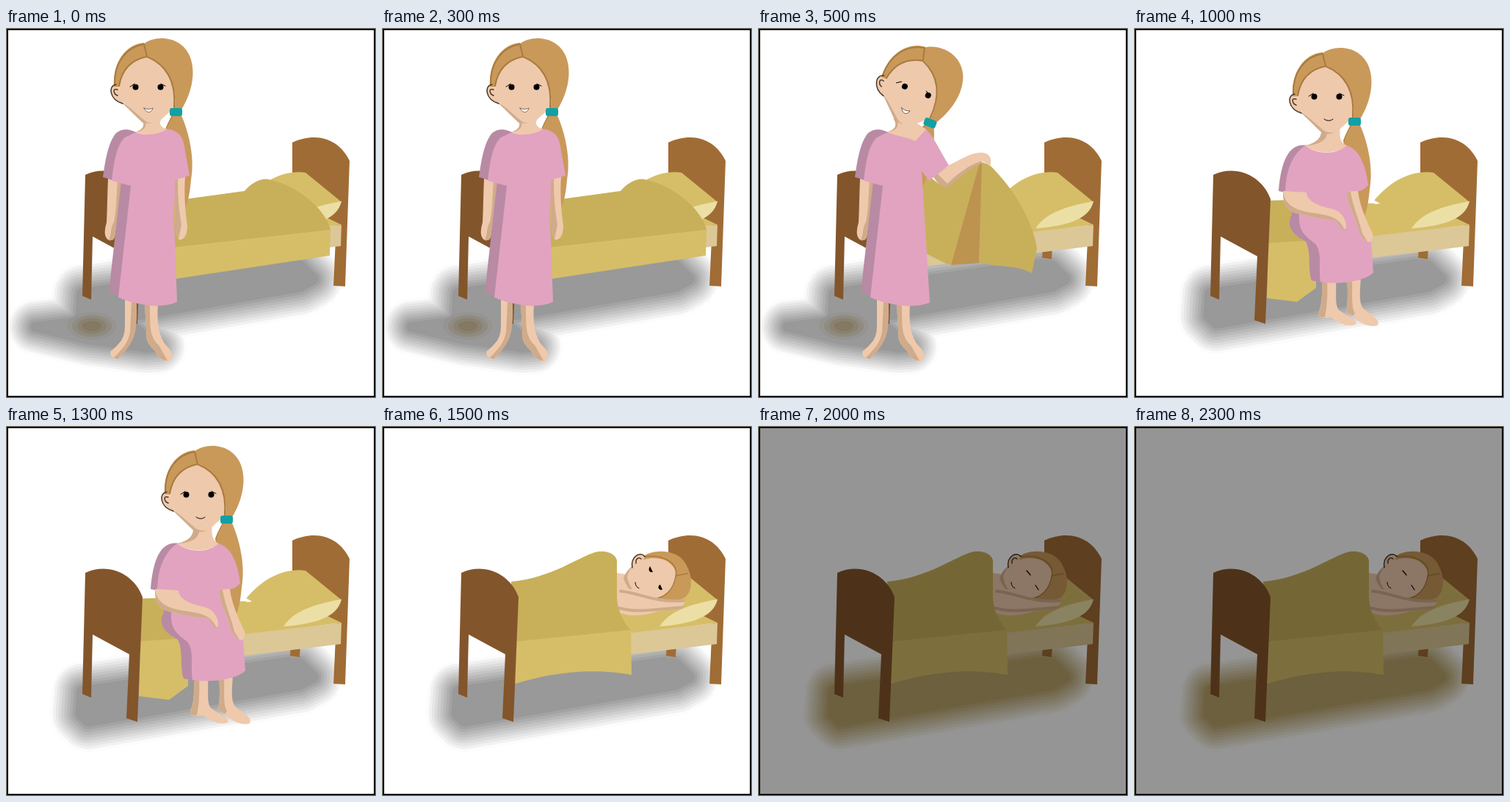
An HTML page with a canvas that plays this animation: 504 by 504 pixels, repeating every 2500 ms.

```html
<!DOCTYPE html>
<html lang="en">
<head>
<meta charset="utf-8">
<title>Bedtime</title>
<style>
html, body { margin: 0; width: 100%; height: 100%; overflow: hidden; background: #fff; }
canvas { display: block; width: 504px; height: 504px; }
</style>
</head>
<body>
<canvas id="stage" width="504" height="504"></canvas>
<script>
const ctx = document.getElementById('stage').getContext('2d');
const STEP = 500;
const C = {
  skin: '#efc9ac', skinDark: '#d0ab8b', hair: '#c9995a', strand: '#a87b3e',
  pink: '#e2a3c0', pinkDark: '#b98aa4', tie: '#12a0a5', ink: '#000',
  wood: '#a06c35', woodDark: '#83552b',
  cover: '#c8b05a', sheet: '#d6be68', mattress: '#dcc797', pillow: '#ecdfa5'
};

function fill(color, path) {
  ctx.fillStyle = color;
  ctx.fill(new Path2D(path));
}

function line(color, width, path) {
  ctx.strokeStyle = color;
  ctx.lineWidth = width;
  ctx.lineCap = ctx.lineJoin = 'round';
  ctx.stroke(new Path2D(path));
}

function oval(color, x, y, rx, ry = rx) {
  ctx.fillStyle = color;
  ctx.beginPath();
  ctx.ellipse(x, y, rx, ry, 0, 0, Math.PI * 2);
  ctx.fill();
}

// Soft shadow built from stepped rings around solid cores
function shadow(withPerson, tint) {
  const cores = [['M104 362L102 392L112 402L400 352L418 342L400 324L385 322Z', 42]];
  if (withPerson) cores.push(['M40 407L110 399L160 397L208 434L190 435L110 424Z', 38]);
  const rings = 11;
  for (let i = 0; i <= rings; i++) {
    const k = i / rings;
    const mix = Math.min(1, 0.03 + 1.2 * k);
    const color = `rgb(${tint.map(v => Math.round(255 + (v - 255) * mix))})`;
    for (const [path, reach] of cores) {
      fill(color, path);
      if (i < rings) line(color, 2 * reach * (1 - k), path);
    }
  }
  if (withPerson) {
    for (let k = 0; k < 4; k++) {
      oval(`rgb(${150 - k * 6},${148 - k * 9},${145 - k * 16})`, 117, 406, 34 - k * 7, 19 - k * 4);
    }
  }
}

function bed() {
  fill(C.wood, 'M388 295L401 295L400 315L387 313Z');
  fill(C.wood, 'M390 156C425 140 455 153 468 181L462 352L446 351L450 268L390 262Z');
  fill(C.sheet, 'M183 236L330 239L432 256L457 268L340 283L183 300Z');
  fill(C.mattress, 'M183 300L457 268L456 297L183 330Z');
  fill(C.sheet, 'M327 235C350 207 380 193 408 197L457 237C440 262 410 268 378 273Z');
  fill(C.pillow, 'M378 273C393 249 430 241 457 236C451 263 415 270 378 273Z');
}

function footboard() {
  fill(C.woodDark, 'M108 200C140 185 175 202 186 233L179 403L164 398L168 311L118 284L116 370L104 365Z');
}

function placed(pose, draw) {
  ctx.save();
  ctx.translate(190.5 + pose.dx, 101 + pose.dy);
  ctx.rotate(pose.turn * Math.PI / 180);
  ctx.translate(-190.5, -101);
  draw();
  ctx.restore();
}

function ponytail() {
  fill(C.hair, 'M227 116L238 117C251 146 257 180 252 207C250 228 248 238 241 252L231 245L216 140C219 133 223 125 227 116Z');
  line(C.strand, 1, 'M228 118C222 127 218 135 217 142');
}

function head({ smiling = false, gaze = 0 } = {}) {
  fill(C.hair, 'M187 22C205 8 242 11 252 43C260 70 247 98 239 111L226 112L190 45Z');
  fill(C.skin, 'M153 77C139 76 139 96 159 103Z');
  fill(C.skinDark, 'M153 97L186 129L198 130L174 112Z');
  fill(C.skin, 'M154 79C157 55 172 41 192 38C216 48 233 72 230 108L211 125C203 131 196 130 190 127L156 98Z');
  fill(C.hair, 'M147 80C145 47 163 22 188 20L192 39C173 43 157 56 154 80Z');
  line(C.strand, 2, 'M188 22L192 39C216 49 232 70 229 108M154 79C158 55 172 43 192 39M148 77C147 48 163 26 188 22');
  line('#49382a', 1.5, 'M150 77C139 78 140 97 159 103M152 84C145 81 146 90 152 92');
  oval(C.ink, 176.5 + gaze, 80.5, 4);
  oval(C.ink, 210.5 + gaze, 80.5, 4);
  line(C.ink, 1, 'M169 80L175 76M211 76L217 79');
  if (smiling) {
    line(C.ink, 1, 'M190 111C194 114 199 114 202 111');
  } else {
    const mouth = 'M188 109C192 111 196 111 200 109C198 117 191 116 188 109Z';
    fill('#fff', mouth);
    line('#5a443a', 0.8, mouth);
  }
  ctx.fillStyle = C.tie;
  ctx.beginPath();
  ctx.roundRect(223, 109, 17, 11, 3);
  ctx.fill();
}

function standingLegs() {
  fill(C.skin, 'M162 370L178 375C178 400 177 415 172 425C165 438 158 445 152 451C145 450 140 445 143 440C158 428 162 420 162 405Z');
  fill(C.skinDark, 'M178 375C178 400 177 415 172 425C165 438 158 445 152 451L147 449C158 438 167 428 169 414L171 373Z');
  fill(C.skin, 'M189 376L207 376C205 400 208 420 218 432C226 440 230 448 222 454C212 455 207 447 203 440C193 430 190 425 191 410Z');
  fill(C.skinDark, 'M189 376L196 377C196 408 196 421 208 432L220 453C211 453 207 447 203 440C193 430 190 425 191 410Z');
}

function standingBody(lifting) {
  standingLegs();
  fill(C.skin, 'M139 205L158 211C155 240 157 260 149 278C149 288 145 290 140 289C133 285 134 275 137 265C138 245 138 225 139 205Z');
  fill(C.skinDark, 'M152 209L158 211C155 240 157 260 149 278C149 288 145 290 140 289C144 280 142 273 147 264C151 246 150 228 152 209Z');
  if (!lifting) {
    fill(C.skin, 'M229 205L244 203C242 230 245 255 247 270C247 285 240 290 235 288L231 275Z');
    fill(C.skinDark, 'M229 205L234 206C234 232 236 252 239 267L235 288L231 275Z');
  }
  fill(C.pinkDark, 'M150 143C160 136 168 138 177 142L172 216L132 203C135 181 139 156 150 143Z');
  fill(C.pinkDark, 'M157 208L175 212L158 367L140 360Z');
  const right = lifting
    ? 'L229 138C239 147 248 168 260 187L233 208L223 195L227 260L234 374'
    : 'C237 140 241 149 243 162L250 201L230 207L229 260L233 373';
  fill(C.pink, 'M177 142C192 148 206 144 217 137' + right +
    'C212 383 180 378 153 367L170 215L144 208C147 184 150 160 162 149Z');
  fill(C.skinDark, 'M184 123L196 128C194 138 185 142 175 142C186 139 191 133 184 123Z');
  const collar = lifting ? 'L217 130L229 138L214 154C202 148 188 147 177 142' :
    'L211 118L210 131C212 135 215 136 219 138C206 146 190 147 177 142';
  fill(C.skin, 'M190 126' + collar + 'C187 140 192 136 190 126Z');
}

function standing() {
  bed();
  fill(C.cover, 'M160 245L245 233L325 222C335 210 350 203 360 207C400 215 437 250 442 275L230 299L160 307Z');
  fill(C.sheet, 'M182 305L442 275L441 310L182 349Z');
  footboard();
  const pose = { dx: 0, dy: 0, turn: 0 };
  placed(pose, ponytail);
  standingBody(false);
  placed(pose, head);
}

function liftingCover() {
  bed();
  fill(C.cover, 'M215 190L224 195L246 212L303 182L264 323L254 320L215 300Z');
  fill('#bd9350', 'M302 183L307 183L301 320L263 323Z');
  fill(C.cover, 'M305 183L315 186C350 220 374 263 380 300L373 334C352 322 328 327 301 319Z');
  footboard();
  const pose = { dx: 10.5, dy: 1, turn: 21 };
  placed(pose, ponytail);
  fill(C.skinDark, 'M238 201L260 188L301 174L306 184C290 190 273 205 258 217C250 218 243 210 238 201Z');
  fill(C.skin, 'M245 199L260 187C275 180 285 172 300 170C315 168 320 178 316 188L305 181C288 186 270 200 258 212Z');
  standingBody(true);
  placed(pose, () => head({ gaze: 5 }));
}

function sitting() {
  bed();
  fill('#fff', 'M326 234L335 239L328 240Z');
  fill(C.cover, 'M183 235L220 234L250 292L183 294Z');
  fill(C.sheet, 'M183 293L248 289L248 354L222 373L181 368Z');
  footboard();
  const pose = { dx: 69, dy: 13, turn: 0 };
  placed(pose, ponytail);
  fill(C.skin, 'M290 340L309 338C308 360 306 372 312 382C325 392 336 398 332 405C322 408 308 404 298 392L289 386C292 370 291 355 290 340Z');
  fill(C.skinDark, 'M290 340L297 340C298 362 295 377 301 389L298 392L289 386C292 370 291 355 290 340Z');
  fill(C.skin, 'M256 342L275 343C276 365 273 378 280 385C295 395 305 398 302 404C290 408 280 402 268 394C258 396 250 395 251 388C257 375 256 360 256 342Z');
  fill(C.skinDark, 'M256 342L263 343C264 362 263 378 260 394C253 394 250 392 251 388C257 375 256 360 256 342Z');
  fill(C.pinkDark, 'M235 160C210 156 200 184 197 222L212 226L215 254C205 272 220 283 234 291C242 306 236 327 242 344L258 347L265 230Z');
  fill(C.pink, 'M233 160C250 173 275 173 289 160C310 165 317 196 319 214C313 221 307 223 299 223L309 262L323 290L326 333C315 345 280 350 254 346C251 325 257 307 247 294C233 283 224 277 225 256L222 224L206 224C207 195 214 174 233 160Z');
  fill(C.skin, 'M290 223L305 222C308 245 318 265 325 280C327 290 322 293 318 291C308 287 306 275 302 262C295 245 290 235 290 223Z');
  fill(C.skinDark, 'M290 223L295 223C298 244 308 264 311 280L318 291C308 287 306 275 302 262C295 245 290 235 290 223Z');
  fill(C.skin, 'M203 222L235 224C236 238 255 243 268 246C285 249 290 265 289 272C285 278 282 270 275 262C265 262 240 257 220 252C205 248 203 235 203 222Z');
  fill(C.skinDark, 'M203 222C205 242 222 249 245 252C266 256 278 256 287 275C284 276 281 270 275 262C258 261 240 257 220 252C205 248 203 235 203 222Z');
  fill(C.skin, 'M255 138L281 132C279 150 282 157 290 160C275 172 250 173 233 160C249 158 257 151 255 138Z');
  fill(C.skinDark, 'M255 138L280 134C274 143 268 145 263 144C262 154 249 160 233 160C249 157 256 149 255 138Z');
  placed(pose, () => head({ smiling: true }));
}

function lying(asleep) {
  bed();
  fill(C.skin, 'M318 200L333 202L350 228L318 232Z');
  fill(C.hair, 'M352 180C370 165 402 169 412 185C424 203 424 225 412 234C400 240 385 237 370 234Z');
  fill(C.skinDark, 'M329 207C332 198 340 190 347 187L360 230C343 232 333 221 329 207Z');
  fill(C.skin, 'M334 205C340 184 364 175 386 183C397 189 402 197 400 207C397 224 384 235 369 235C350 237 337 223 334 205Z');
  line(C.strand, 1.5, 'M357 178C384 174 404 187 400 205C397 224 384 235 370 235M400 204L416 201');
  fill(C.skin, 'M341 193C338 178 352 170 358 179L350 190Z');
  line('#49382a', 1.5, 'M341 193C338 178 352 170 358 178M346 187C345 181 350 178 353 181');
  if (asleep) {
    line(C.ink, 1.2, 'M366 197L371 203M378 217L382 223');
  } else {
    fill(C.ink, 'M365 191C362 196 364 200 369 199Z');
    fill(C.ink, 'M379 216C374 219 377 224 382 223Z');
  }
  line(C.ink, 1, 'M345 213C345 217 347 220 350 221');
  fill(C.skin, 'M318 229C334 219 350 221 360 230C378 236 397 239 413 237C413 249 395 249 377 252C355 259 335 261 318 252Z');
  line(C.skinDark, 4, 'M325 225C350 227 370 241 411 238M323 248C348 255 371 250 408 247');
  fill(C.cover, 'M176 212C230 207 265 180 290 172C305 168 318 174 320 183L320 235C322 255 330 269 339 278L178 294Z');
  fill(C.sheet, 'M178 294L339 278L340 339C300 332 250 330 178 352Z');
  footboard();
}

const scenes = [standing, liftingCover, sitting, () => lying(false), () => lying(true)];

function render(time) {
  const scene = Math.floor(time / STEP) % scenes.length;
  const night = scene === 4;
  ctx.fillStyle = '#fff';
  ctx.fillRect(0, 0, 504, 504);
  shadow(scene < 2, night ? [184, 163, 106] : [153, 153, 153]);
  scenes[scene]();
  if (night) {
    ctx.fillStyle = 'rgba(0,0,0,0.415)';
    ctx.fillRect(0, 0, 504, 504);
  }
  ctx.lineJoin = 'miter';
  ctx.lineWidth = 1;
  ctx.strokeStyle = '#808070';
  ctx.strokeRect(0.5, 0.5, 503, 503);
  ctx.lineWidth = 2;
  ctx.strokeStyle = C.ink;
  ctx.strokeRect(2, 2, 500, 500);
}

let start;
function tick(now) {
  start ??= now;
  render(now - start);
  requestAnimationFrame(tick);
}
render(0);
requestAnimationFrame(tick);
</script>
</body>
</html>
```
